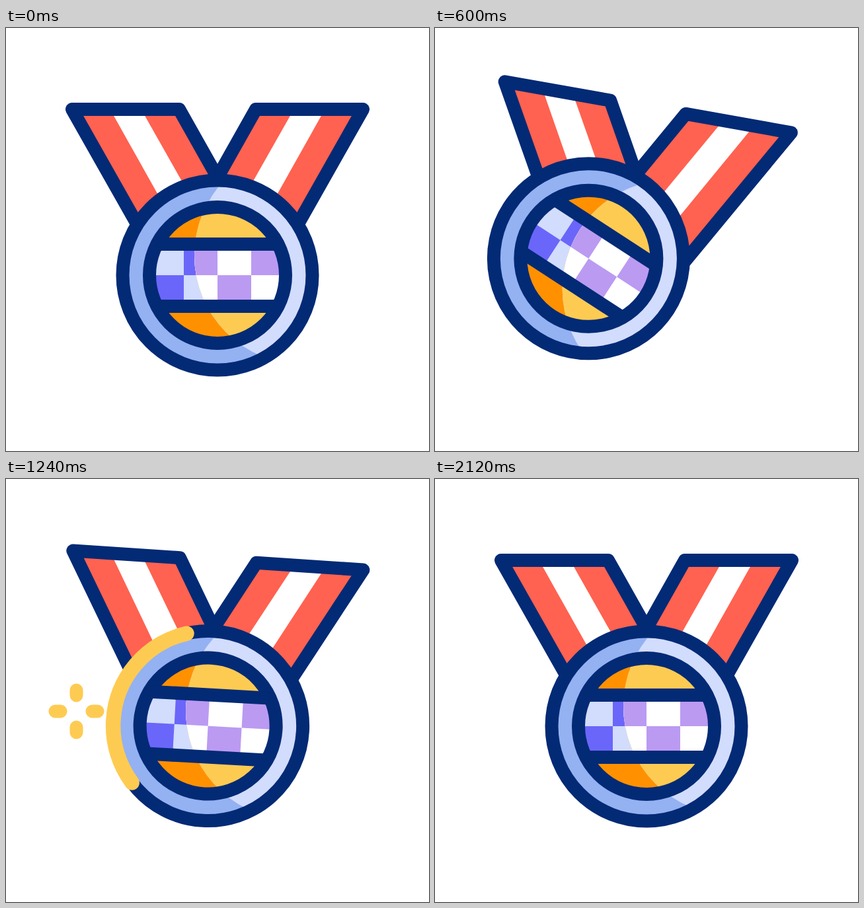
Animation, 640 px wide and 640 px high, one loop 2440 ms. Source, as an HTML page:

```html
<!DOCTYPE html>
<html lang="en">
<head>
<meta charset="utf-8">
<title>Swinging medal</title>
<style>
  html, body { margin: 0; height: 100%; overflow: hidden; background: #fff; }
  svg { display: block; width: 100vw; height: 100vh; }
</style>
</head>
<body>
<svg viewBox="0 0 640 640">
  <defs>
    <clipPath id="disc"><circle r="140"/></clipPath>
    <clipPath id="light"><circle cx="130" cy="-30" r="165"/></clipPath>
    <path id="band" d="M100 123H262L320 226L242 374Z"/>
    <g id="strap">
      <use href="#band" fill="#ff6250"/>
      <path d="M157.5 123H204.5L290 274L258 302Z" fill="#fff"/>
      <use href="#band" fill="none" stroke="#032a75" stroke-width="20" stroke-linejoin="round"/>
    </g>
  </defs>
  <g id="ribbon">
    <use href="#strap"/>
    <use href="#strap" transform="matrix(-1 0 0 1 640 0)"/>
  </g>
  <g id="medal">
    <g clip-path="url(#disc)">
      <g id="shade"></g>
      <g clip-path="url(#light)"><g id="lit"></g></g>
    </g>
    <g fill="none" stroke="#032a75" stroke-width="20">
      <circle r="143.5"/>
      <circle r="103"/>
      <path d="M-90 -47H90M-90 47H90"/>
    </g>
    <circle id="arc" r="143.5" pathLength="360" transform="rotate(-90)" fill="none"
      stroke="#fecb52" stroke-width="22.5" stroke-linecap="round"/>
  </g>
  <g id="spark" stroke="#fecb52" stroke-linecap="round"></g>
</svg>
<script>
const $ = id => document.getElementById(id);
const LOOP = 2440, STEP = 40;
const TOP = 136, JOINT = 114, DROP = 124; // hanging point, then the two arm lengths

const face = (ring, gold, pale, check) => `
  <circle r="140" fill="${ring}"/>
  <circle r="98" fill="${gold}"/>
  <path d="M-98 -47H98V47H-98Z" fill="${pale}"/>
  <path d="M-51 -47H0V47H51V0H-98V47H-51Z M51 -47H98V0H51Z" fill="${check}" fill-rule="evenodd"/>`;
$('shade').innerHTML = face('#94b1f2', '#ff9100', '#d2dcfd', '#6b66fa');
$('lit').innerHTML = face('#d2dcfd', '#fecb52', '#fff', '#bb9af2');
$('spark').innerHTML = [0, 90, 180, 270]
  .map(r => `<line transform="translate(106.5 351.5) rotate(${r})"/>`).join('');

const mix = (a, b, x) => a + (b - a) * x;
const ramp = (t, t0, t1) => Math.max(0, Math.min(1, (t - t0) / (t1 - t0)));
function ease(t, t0, t1) {
  const x = ramp(t, t0, t1);
  return x * x * (3 - 2 * x);
}

// Rise to a peak, rock back and forth at half the size each turn, settle at rest
function rock(t, { from, to, peak, turn, span, back, turns }) {
  let angle = peak * ease(t, from, to);
  for (let k = 0; k < turns; k++, turn += span)
    angle = mix(angle, -back * (-.5) ** k, ease(t, turn, turn + span));
  return mix(angle, 0, ease(t, turn, 2120));
}
const tilt = { from: 0, to: 280, peak: 10.1, turn: 595, span: 305, back: 8, turns: 3 };
const swing = { from: 232, to: 480, peak: 29, turn: 480, span: 480, back: 9.5, turns: 2 };

// Crouch, jump, land
function lift(t) {
  const y = mix(18 * ease(t, 0, 240), -34, ease(t, 240, 485));
  return mix(y, 0, ease(t, 485, 628));
}

function drawMedal(t) {
  const a = rock(t, tilt), b = rock(t, swing), y = lift(t);
  $('ribbon').setAttribute('transform', `translate(0 ${y}) rotate(${a} 320 ${TOP})`);
  $('medal').setAttribute('transform',
    `translate(320 ${TOP + y}) rotate(${a}) translate(0 ${JOINT}) rotate(${b}) translate(0 ${DROP})`);
}

function drawArc(t) {
  const head = 360 * ramp(t, 600, 1270), tail = 360 * ramp(t, 654, 1571);
  const arc = $('arc');
  arc.style.display = t > 600 && t < 1560 ? '' : 'none';
  arc.setAttribute('stroke-dasharray', `${head - tail} 720`);
  arc.setAttribute('stroke-dashoffset', -tail);
}

// Four rays burst out, then shrink towards their middles
function drawSpark(t) {
  const grow = ease(t, 620, 750);
  const half = 3.5 + 9.5 * Math.exp(-Math.max(0, t - 750) / 170);
  $('spark').setAttribute('stroke-width', 20 * ease(t, 620, 680) * (1 - ease(t, 1300, 1420)));
  for (const ray of $('spark').children) {
    ray.setAttribute('x1', grow * (28 - half));
    ray.setAttribute('x2', grow * (28 + half));
  }
}

const start = performance.now();
function frame() {
  const t = Math.floor((performance.now() - start) % LOOP / STEP) * STEP;
  drawMedal(t);
  drawArc(t);
  drawSpark(t);
  requestAnimationFrame(frame);
}
frame();
</script>
</body>
</html>
```
